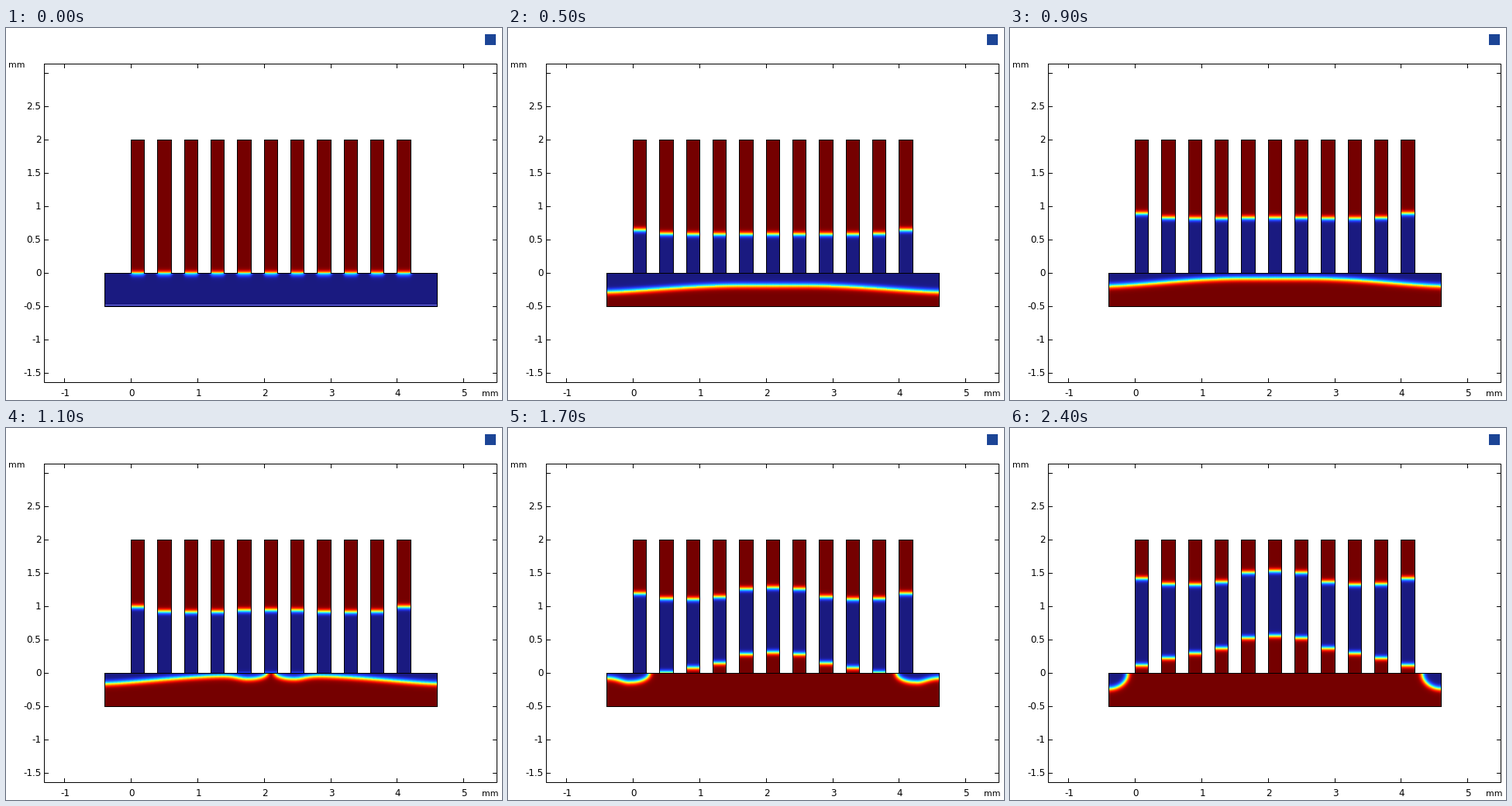
These frames come from a looping animation (640 by 480 pixels, 2500 ms). A matplotlib script:

```python
import numpy as np
import matplotlib.pyplot as plt
from matplotlib.animation import FuncAnimation
from matplotlib.colors import LinearSegmentedColormap

W, H, DPI = 640, 480, 100
FRAMES, STEP = 25, 100
PX = 72 / DPI          # one pixel in points
UNIT = 86              # pixels per millimetre
SOFT_FIN, SOFT_BASE, SOFT_GLOW = 3.7, 4.2, 4.6

plt.rcParams["font.family"] = "DejaVu Sans"


def px(x):
    return int(161.5 + 85.85 * x)


def py(y):
    return int(316.4 - UNIT * y)


LEFT, RIGHT = px(-0.4), px(4.6)
TOP, FLOOR, BOTTOM = py(2), py(0), py(-0.5)
FINS = [(px(0.4 * i), px(0.4 * i + 0.2)) for i in range(11)]

CMAP = LinearSegmentedColormap.from_list("heat", [
    (0.00, "#1a1a80"), (0.03, "#1c1c90"), (0.13, "#2038f8"), (0.25, "#2088ff"),
    (0.38, "#20f0ff"), (0.50, "#90ffa0"), (0.62, "#fff820"), (0.75, "#ff9000"),
    (0.88, "#ff1000"), (0.97, "#900000"), (1.00, "#750000")], N=512)
CMAP.set_bad((0, 0, 0, 0))

COLS = np.arange(RIGHT - LEFT + 1) + 0.5
WALL = np.minimum(COLS, COLS[::-1])[None, :]        # distance to a side wall
DEEP = (np.arange(BOTTOM - FLOOR + 1) + 0.5)[:, None]
RISE = FLOOR + 0.5 - np.arange(TOP, FLOOR)          # height inside a fin


def step(d, soft):
    return 0.5 + 0.5 * np.tanh(d / soft)


def fin_fronts(k, t):
    """Upper and lower front (px) of the k-th fin from the side."""
    climb = 0.92 * t**0.5 + 0.035 * np.exp(-((t - 1.05) / 0.3) ** 2)
    lag = 0.078 * t**0.25 * (1 - np.exp(-2 * k))
    boost = 0.21 * step(t - 1.4, 0.35) * step(k - 3.4, 0.6)
    length = 0.96 + 0.335 * np.exp(-0.85 * k)
    upper = climb - lag + boost
    return upper * UNIT, (upper - length) * UNIT


def sheet(s, t):
    """Depth of the undisturbed front at distance s from the wall."""
    bow = np.sin(np.pi / 2 * np.minimum(s / 175, 1)) ** 1.4
    return 52 - 37 * t**0.42 - 10 * t**0.25 * bow


def base_front(t):
    """Sheet that ends in a rounded rim retreating to the wall."""
    end = np.interp(t, [0.9, 1.3, 1.7, 2.1, 2.4], [300, 118, 55, 20.5, 24.5])
    rim = np.interp(t, [0.9, 1.3, 1.7, 2.1, 2.4], [6, 8.5, 11.5, 25, 20])
    radius = min(24, end)
    start = end - radius
    s = np.linspace(0, start, 150)
    swell = (rim - sheet(start, t)) * np.exp(-((s - start) / 18) ** 2)
    turn = np.linspace(0, np.pi / 2, 40)
    return (np.r_[s, start + radius * np.sin(turn), end + 1, 400],
            np.r_[sheet(s, t) + swell, rim * np.cos(turn), -9, -15])


def base_field(t):
    s, d = base_front(t)
    gap = np.full((DEEP.size, COLS.size), 1e9)
    for a, b in zip(s, d):
        gap = np.minimum(gap, (WALL - a) ** 2 + (DEEP - b) ** 2)
    side = np.where(DEEP > np.interp(WALL, s, d), 1, -1)
    c = step(side * np.sqrt(gap), SOFT_BASE)
    # heat spilling down from fronts still near the fin feet
    for i, (l, r) in enumerate(FINS):
        up, _ = fin_fronts(min(i, 10 - i), t)
        window = step(COLS - l + LEFT, 2.5) * step(r + 1 - LEFT - COLS, 2.5)
        c = np.maximum(c, step(-DEEP - up, SOFT_GLOW) * window)
    return c


def field(t):
    c = np.full((BOTTOM - TOP + 1, COLS.size), np.nan)
    c[FLOOR - TOP:] = base_field(t)
    for i, (l, r) in enumerate(FINS):
        up, low = fin_fronts(min(i, 10 - i), t)
        cold = step(up - RISE, SOFT_FIN) * step(RISE - low, SOFT_FIN)
        c[:FLOOR - TOP, l - LEFT:r - LEFT + 1] = 1 - cold[:, None]
    return np.ma.masked_invalid(c)


fig = plt.figure(figsize=(W / DPI, H / DPI), dpi=DPI, facecolor="white")
ax = fig.add_axes([0, 0, 1, 1])
ax.axis("off")

image = ax.imshow(field(0), cmap=CMAP, vmin=0, vmax=1, aspect="auto",
                  interpolation="nearest",
                  extent=(LEFT, RIGHT + 1, BOTTOM + 1, TOP))
ax.set(xlim=(0, W), ylim=(H, 0))


def line(xs, ys, color="black"):
    # the small offset makes snapping pick the named pixel
    return ax.plot(np.array(xs) + 0.2, np.array(ys) + 0.2, color=color, lw=PX,
                   snap=True, solid_capstyle="projecting",
                   solid_joinstyle="miter")[0]


def label(x, y, text, ha, size=12):
    ax.text(x, y, text, ha=ha, va="baseline", fontsize=size * PX)


# Frame, ticks and labels
X0, X1, Y0, Y1, TICK = 49, 633, 46, 457, 5
line([X0, X1, X1, X0, X0], [Y0, Y0, Y1, Y1, Y0])
for v in range(-1, 6):
    x = px(v)
    line([x, x], [Y0, Y0 + TICK])
    line([x, x], [Y1 - TICK, Y1])
    label(x + 1, 475, str(v), "center")
for v in np.arange(-1.5, 3.1, 0.5):
    y = py(v)
    line([X0, X0 + TICK], [y, y])
    line([X1 - TICK, X1], [y, y])
    if v < 3:
        label(45.4, y + 4, f"{v:g}", "right")
label(3, 51, "mm", "left", 11)
label(614, 475, "mm", "left", 11)

ax.add_patch(plt.Rectangle((618, 8), 14, 14, color="#1c4596", lw=0))

# Outlines
line([LEFT, LEFT, RIGHT, RIGHT], [FLOOR, BOTTOM, BOTTOM, FLOOR])
edges = [LEFT] + [x for fin in FINS for x in fin] + [RIGHT]
for a, b in zip(edges[::2], edges[1::2]):
    line([a, b], [FLOOR, FLOOR])
for l, r in FINS:
    line([l, l, r, r], [FLOOR, TOP, TOP, FLOOR])
joints = [line([l + 1, r - 1], [FLOOR, FLOOR]) for l, r in FINS]
seam = line([LEFT + 1, RIGHT - 1], [BOTTOM - 2, BOTTOM - 2], "#7878e6")


def draw(n):
    image.set_data(field(n * STEP / 1000))
    seam.set_visible(n == 0)
    for j in joints:
        j.set_visible(n > 0)
    return [image, seam, *joints]


anim = FuncAnimation(fig, draw, frames=FRAMES, interval=STEP,
                     repeat=True, repeat_delay=0, blit=False)
plt.show()
```
